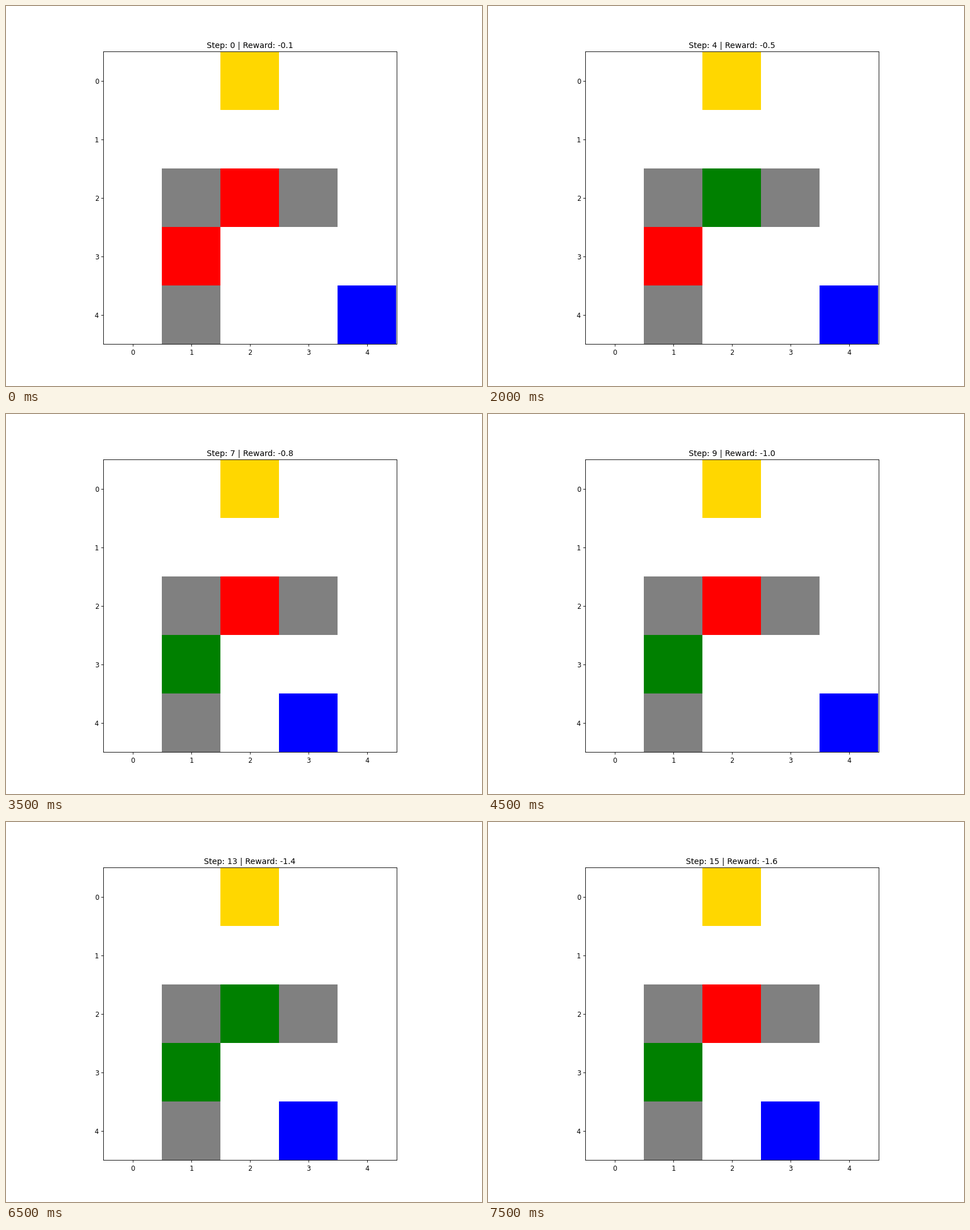
A matplotlib script for the animation above (8000 ms loop, 837x669 px).

```python
import numpy as np
import matplotlib.pyplot as plt
from matplotlib.animation import FuncAnimation
from matplotlib.colors import ListedColormap

SIZE = 5
EMPTY, WALL, RED, GREEN, GOAL, AGENT = range(6)
CMAP = ListedColormap(["white", "gray", "red", "green", "gold", "blue"])

WALLS = [(2, 1), (2, 3), (4, 1)]
GOAL_CELL = (0, 2)

# Steps at which each traffic light is green; it is red otherwise.
LIGHTS = {
    (2, 2): {4, 12, 13},
    (3, 1): {3, 6, 7, 9, 12, 13, 15},
}

# Column of the agent in the bottom row, one digit per step.
AGENT_COLS = [int(c) for c in "4343432344343343"]

WIDTH, HEIGHT, DPI = 837, 669, 83.7


def grid_at(step):
    grid = np.full((SIZE, SIZE), EMPTY)
    for cell in WALLS:
        grid[cell] = WALL
    for cell, green_steps in LIGHTS.items():
        grid[cell] = GREEN if step in green_steps else RED
    grid[GOAL_CELL] = GOAL
    grid[SIZE - 1, AGENT_COLS[step]] = AGENT
    return grid


def title_at(step):
    return f"Step: {step} | Reward: {-0.1 * (step + 1):.1f}"


# The extra 0.01 px guards against float truncation of the canvas size.
fig, ax = plt.subplots(figsize=((WIDTH + 0.01) / DPI, (HEIGHT + 0.01) / DPI),
                       dpi=DPI)

# The image ends just inside the axes, so every cell is a whole 103 px.
low, high = -0.5, SIZE - 0.5
edge = high - 0.005
image = ax.imshow(grid_at(0), cmap=CMAP, vmin=EMPTY, vmax=AGENT,
                  interpolation="nearest", extent=(low, edge, edge, low))
ax.set(xlim=(low, high), ylim=(high, low))
ax.set_xticks(range(SIZE))
ax.set_yticks(range(SIZE))
title = ax.set_title(title_at(0))


def update(step):
    image.set_data(grid_at(step))
    title.set_text(title_at(step))
    return image, title


anim = FuncAnimation(fig, update, frames=len(AGENT_COLS), interval=500,
                     repeat=True, repeat_delay=0)
plt.show()
```
